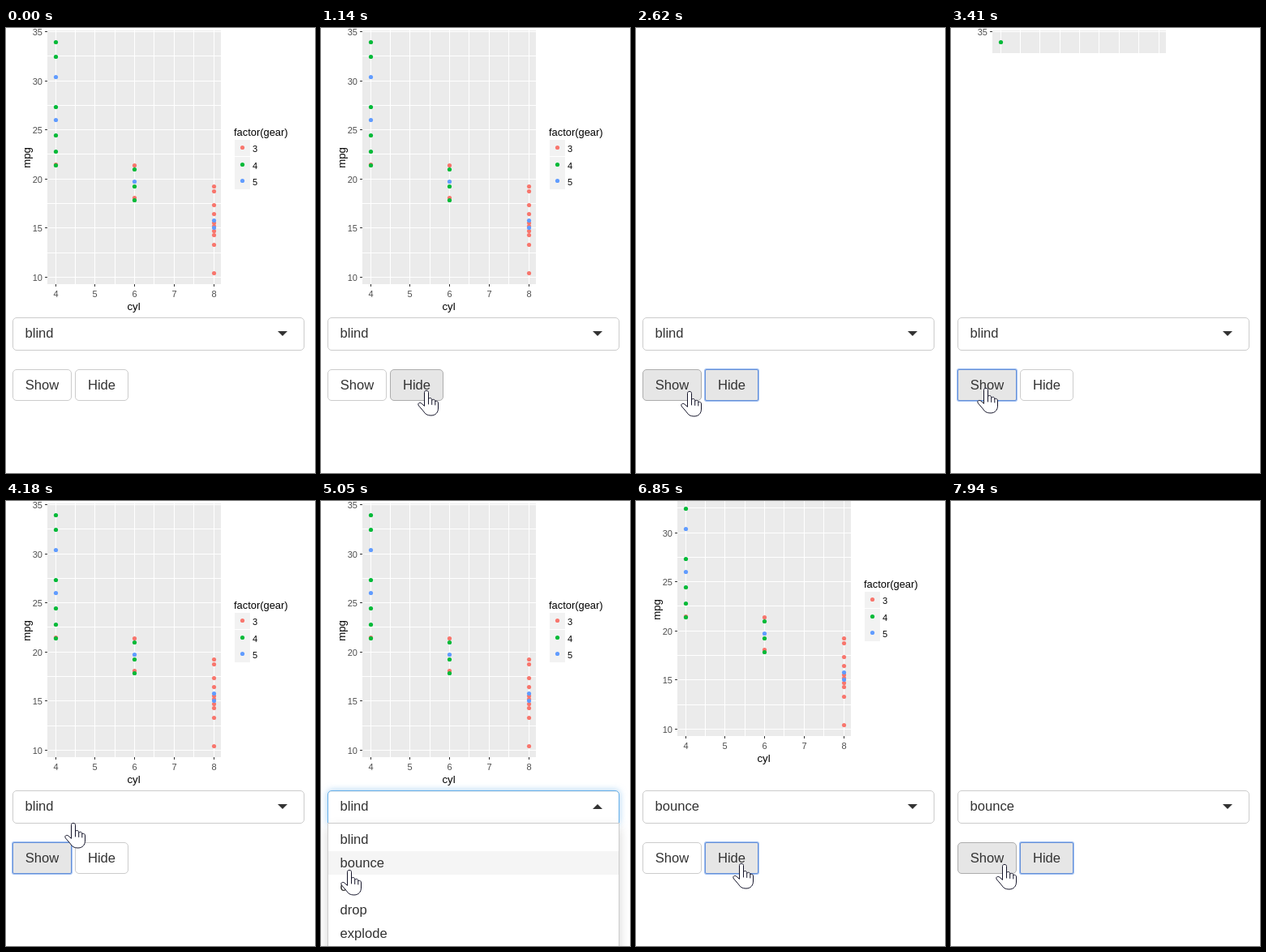
Recreate the animation shown at these times as an HTML page. Size 381 by 549 pixels, loop 8 s.

```html
<!DOCTYPE html>
<html lang="en">
<head>
<meta charset="utf-8">
<title>Plot show and hide</title>
<style>
html, body { margin: 0; width: 100%; height: 100%; overflow: hidden; background: #fff; }
body { position: relative; font: 16.6px "Liberation Sans", Arial, sans-serif; color: #333; }
div, #hand { position: absolute; box-sizing: border-box; }
#plot { left: 0; top: 0; width: 381px; overflow: hidden; }
#plot svg { display: block; }
#select, .btn { border: 1px solid #ccc; border-radius: 5px; background: #fff; }
#select { left: 8px; top: 357px; width: 360px; height: 41px; padding-left: 14.5px; line-height: 38px; }
#select.focus { border-color: #66afe9; box-shadow: inset 0 1px 1px rgba(0,0,0,.075), 0 0 8px rgba(102,175,233,.6); }
#select.open { border-radius: 5px 5px 0 0; }
#arrow { left: 326px; top: 16px; border: solid transparent; border-width: 6px 6px 0; border-top-color: #333; }
.open #arrow { transform: scaleY(-1); }
.btn { top: 421px; height: 39px; line-height: 37px; text-align: center; }
#show { left: 8px; width: 73px; }
#hide { left: 85px; width: 66px; }
.btn.hover { background: #e6e6e6; border-color: #adadad; }
.btn.focus { background: #e6e6e6; border-color: #6690d8; border-radius: 2px; box-shadow: 0 0 0 1px rgba(110,158,235,.65); }
.btn.down { background: #d4d4d4; box-shadow: inset 0 3px 5px rgba(0,0,0,.125), 0 0 0 1px rgba(110,158,235,.65); }
#menu { left: 8px; top: 397px; width: 360px; height: 200px; padding: 5px 0; background: #fff;
  border: 1px solid #ccc; box-shadow: 0 6px 12px rgba(0,0,0,.175); }
#menu p { margin: 0; padding-left: 14.5px; line-height: 29px; }
#menu .active { background: #f5f5f5; }
#hand { left: 0; top: 0; overflow: visible; }
</style>
</head>
<body>
<div id="plot"><svg width="381" height="351"></svg></div>
<div id="select"><span id="value"></span><div id="arrow"></div></div>
<div class="btn" id="show">Show</div>
<div class="btn" id="hide">Hide</div>
<div id="menu"><p>blind</p><p>bounce</p><p>clip</p><p>drop</p><p>explode</p><p>fade</p></div>
<svg id="hand" width="1" height="1"><g transform="translate(.5)" fill="#fff" stroke="#15152a" stroke-linejoin="round" stroke-linecap="round">
<path d="M-2 19V2.5C-2-.3 3-.3 3 2.5V11C3.4 8.8 7 9 7.2 11.5V12.5C8 10.6 11 11 11.3 13V14C12 12.7 15 13 15 16V22C15 27 12 31 6.5 31C1 31-1 29-3 26L-9 19C-11 16.3-8 14.2-5.7 16Z"/>
<path fill="none" d="M3 11V17M7.2 12.5V17.5M11.3 14V18"/></g></svg>
<script>
const LOOP = 8000, HEIGHT = 351, EFFECT = 400;
const $ = id => document.getElementById(id);

// Scatter plot: mpg values by cylinders and gear
const colors = { 3: '#F8766D', 4: '#00BA38', 5: '#619CFF' };
const cars = {
  4: { 3: [21.5], 4: [33.9, 32.4, 27.3, 24.4, 22.8, 21.4], 5: [30.4, 26] },
  6: { 3: [21.4, 18.1], 4: [21, 19.2, 17.8], 5: [19.7] },
  8: { 3: [19.2, 18.7, 17.3, 16.4, 15.5, 15.2, 14.7, 14.3, 13.3, 10.4], 5: [15.8, 15] }
};
const px = cyl => Math.floor(61.1 + (cyl - 4) * 48.75);
const py = mpg => Math.floor(4.4 + (35 - mpg) * 12.12);
const rect = (x, y, w, h, fill) =>
  `<rect x="${x}" y="${y}" width="${w}" height="${h}" fill="${fill}" shape-rendering="crispEdges"/>`;
const text = (x, y, s, size, fill, more = '') =>
  `<text x="${x}" y="${y}" font-size="${size}" fill="${fill}" ${more}>${s}</text>`;
const dot = (x, y, gear) => `<circle cx="${x + .5}" cy="${y + .5}" r="2.6" fill="${colors[gear]}"/>`;

function drawPlot() {
  const middle = 'text-anchor="middle"', end = 'text-anchor="end"';
  let s = rect(51, 3, 214, 313, '#ebebeb');
  for (let c = 4; c <= 8; c += .5) {
    s += rect(px(c), 3, 1, 313, '#fff');
    if (c % 1 === 0) s += rect(px(c), 316, 1, 3, '#333') + text(px(c) + .5, 332, c, 11, '#4d4d4d', middle);
  }
  for (let m = 10; m <= 35; m += 2.5) {
    s += rect(51, py(m), 214, 1, '#fff');
    if (m % 5 === 0) s += rect(48, py(m), 3, 1, '#333') + text(45, py(m) + 5, m, 11, '#4d4d4d', end);
  }
  for (const cyl in cars)
    for (const gear in cars[cyl])
      for (const mpg of cars[cyl][gear]) s += dot(px(cyl), py(mpg), gear);
  s += text(157.5, 348, 'cyl', 13.2, '#000', middle);
  s += text(0, 0, 'mpg', 13.2, '#000', middle + ' transform="translate(30 160) rotate(-90)"');
  s += text(281, 133, 'factor(gear)', 12.9, '#000');
  for (let i = 0; i < 3; i++) {
    const y = Math.round(147 + i * 20.5);
    s += rect(282, y - 9, 19, 20, '#f2f2f2') + dot(291, y, i + 3) + text(304, y + 6, i + 3, 11, '#000');
  }
  $('plot').firstChild.innerHTML = s;
}

const clamp = v => Math.max(0, Math.min(1, v));
const swing = p => .5 - Math.cos(Math.PI * clamp(p)) / 2;

// Pointer moves: start, end, then where the fingertip comes to rest
const HIDE = [129, 447], SHOW = [42, 444], SHOW_EDGE = [65, 448], SELECT = [107, 369], OPTION = [34, 455];
const moves = [
  [530, 1140, HIDE], [2330, 2620, SHOW_EDGE], [2720, 2940, SHOW], [3880, 4400, SELECT],
  [4680, 5050, OPTION], [5525, 6060, HIDE], [7650, 7940, SHOW_EDGE]
];
function pointer(t) {
  let x = 302, y = 532;
  for (const [from, to, spot] of moves) {
    const e = swing((t - from) / (to - from));
    x += (spot[0] - x) * e;
    y += (spot[1] - y) * e;
  }
  return [x, y];
}

// Bounce out: five bounces of doubling height, then fly up and fade
function bounce(p) {
  const leg = Math.floor(p * 11), s = swing(p * 11 - leg);
  const lift = HEIGHT / 48 * 2 ** (leg >> 1);
  return { lift: lift * (leg % 2 ? 1 - s : s), opacity: leg > 9 ? 1 - s : 1 };
}

function plotState(t) {
  const progress = start => (t - start) / EFFECT;
  if (t < 3260) return { size: 1 - swing(progress(1576)) };
  if (t < 6577) return { size: swing(progress(3334)) };
  return progress(6577) < 1 ? { size: 1, ...bounce(progress(6577)) } : { size: 0 };
}

function render(now) {
  const t = now % LOOP;
  const between = (a, b) => t >= a && t < b;
  const [x, y] = pointer(t);
  const open = between(4500, 5280);

  const { size, lift = 0, opacity = 1 } = plotState(t);
  const plot = $('plot').style;
  plot.height = Math.round(size * HEIGHT) + 'px';
  plot.transform = `translateY(${-Math.round(lift)}px)`;
  plot.opacity = opacity;

  $('value').textContent = t < 5280 ? 'blind' : 'bounce';
  $('select').className = (between(4500, 6380) ? 'focus ' : '') + (open ? 'open' : '');
  $('menu').style.display = open ? '' : 'none';
  const active = Math.max(0, Math.floor((y - 403) / 29));
  [...$('menu').children].forEach((p, i) => p.className = i === active ? 'active' : '');

  const button = (id, left, right, focus, down) => {
    const hover = x >= left && x < right && y >= 421 && y < 460;
    $(id).className = 'btn' + (hover ? ' hover' : '') + (focus ? ' focus' : '') + (down ? ' down' : '');
  };
  button('show', 8, 81, between(3260, 4500), between(3260, 3330));
  button('hide', 85, 151, between(1460, 3260) || t >= 6380, between(1460, 1540) || between(6380, 6550));

  $('hand').style.display = t < 530 ? 'none' : '';
  $('hand').style.transform = `translate(${Math.round(x)}px, ${Math.round(y)}px)`;
}

drawPlot();
const begin = performance.now();
function tick() {
  render(performance.now() - begin);
  requestAnimationFrame(tick);
}
tick();
</script>
</body>
</html>
```
